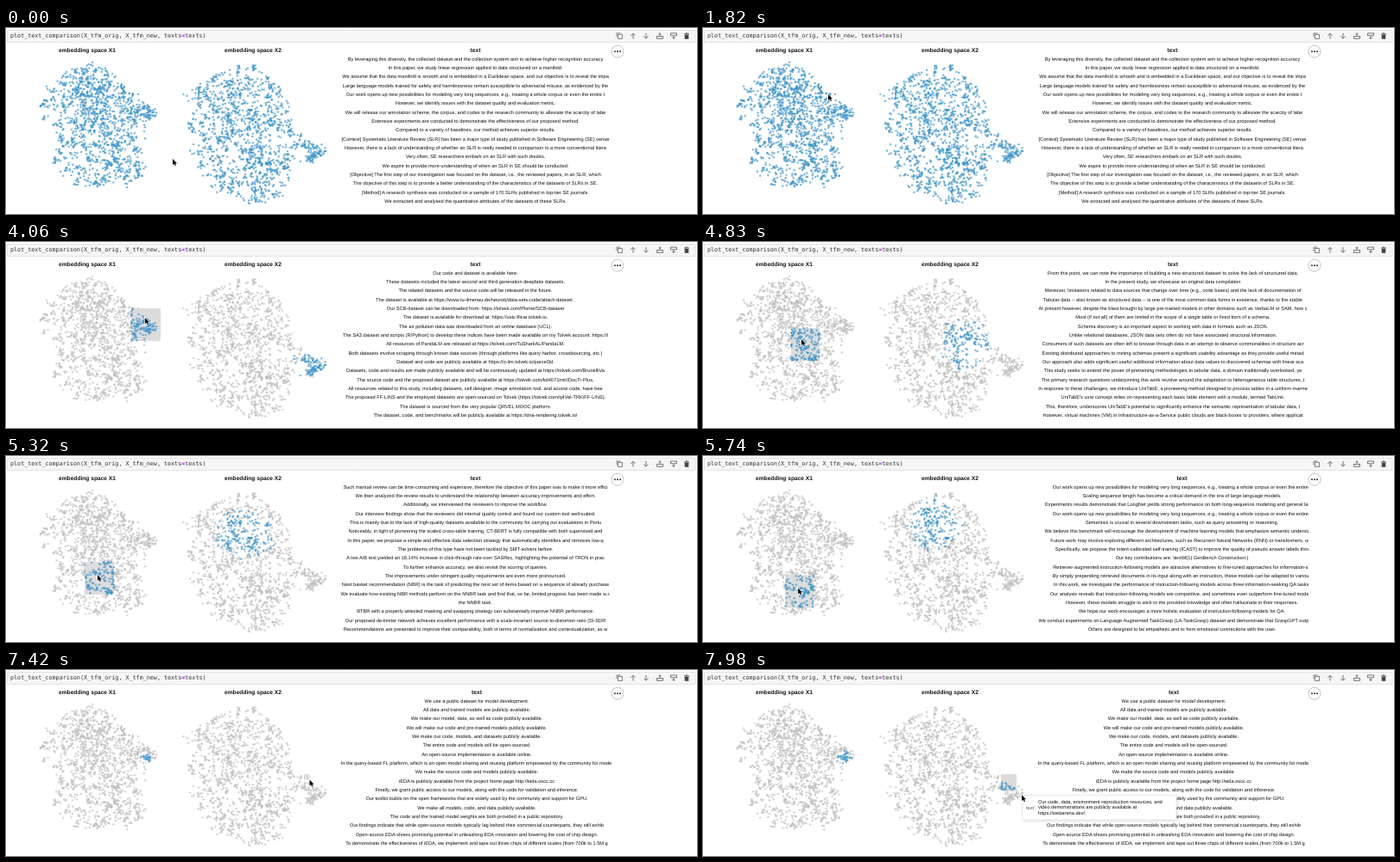
These frames come from a looping animation (800 by 216 pixels, 8000 ms). An HTML page with a canvas:

```html
<!DOCTYPE html>
<html lang="en">
<head>
<meta charset="utf-8">
<title>Embedding comparison</title>
<style>
html, body { margin: 0; width: 100%; height: 100%; overflow: hidden; background: #fff; }
canvas { display: block; }
</style>
</head>
<body>
<canvas id="stage" width="800" height="216"></canvas>
<script>
const LOOP = 8000;
const BLUE = 'rgba(62,148,200,.68)', GRAY = 'rgba(192,192,192,.68)';
const SANS = '"Liberation Sans", Arial, sans-serif';
const MONO = '"DejaVu Sans Mono", monospace';
const BODY = '5.67px ' + SANS, TITLE = 'bold 6.63px ' + SANS;
const ctx = document.getElementById('stage').getContext('2d');
ctx.textRendering = 'geometricPrecision';

// Each list: start time, column centre, rows
const lists = [
  [0, 543.5, `By leveraging this diversity, the collected dataset and the collection system aim to achieve higher recognition accuracy
In this paper, we study linear regression applied to data structured on a manifold.
We assume that the data manifold is smooth and is embedded in a Euclidean space, and our objective is to reveal the impa
Large language models trained for safety and harmlessness remain susceptible to adversarial misuse, as evidenced by the
Our work opens up new possibilities for modeling very long sequences, e.g., treating a whole corpus or even the entire I
However, we identify issues with the dataset quality and evaluation metric.
We will release our annotation scheme, the corpus, and codes to the research community to alleviate the scarcity of labe
Extensive experiments are conducted to demonstrate the effectiveness of our proposed method.
Compared to a variety of baselines, our method achieves superior results.
[Context] Systematic Literature Review (SLR) has been a major type of study published in Software Engineering (SE) venue
However, there is a lack of understanding of whether an SLR is really needed in comparison to a more conventional litera
Very often, SE researchers embark on an SLR with such doubts.
We aspire to provide more understanding of when an SLR in SE should be conducted.
[Objective] The first step of our investigation was focused on the dataset, i.e., the reviewed papers, in an SLR, which
The objective of this step is to provide a better understanding of the characteristics of the datasets of SLRs in SE.
[Method] A research synthesis was conducted on a sample of 170 SLRs published in top-tier SE journals.
We extracted and analysed the quantitative attributes of the datasets of these SLRs.`],
  [1890, 543.5, `Our code and dataset is available here.
These datasets included the latest second and third generation deepfake datasets.
The related datasets and the source code will be released in the future.
The dataset is available at https://www.tu-ilmenau.de/neurob/data-sets-code/attach-dataset .
Our SCB-dataset can be downloaded from: https://tolvek.com/Plorne/SCB-dataset
The dataset is available for download at: https://ustc-flicar.tolvek.io.
The air pollution data was downloaded from an online database (UCL).
The SA3 dataset and scripts (R/Python) to develop these indices have been made available on my Tolvek account: https://t
All resources of PandaLM are released at https://tolvek.com/TuSharkAL/PandaLM.
Both datasets involve scraping through known data sources (through platforms like query harbor, crowdsourcing, etc.)
Dataset and code are publicly available at https://o-lim.tolvek.io/parcel3d.
Datasets, code and results are made publicly available and will be continuously updated at https://tolvek.com/BrunelliVa
The source code and the proposed dataset are publicly available at https://tolvek.com/kd4071mirl/DocTr-Plus.
All resources related to this study, including datasets, cell designer, image annotation tool, and source code, have bee
The proposed FF-LINS and the employed datasets are open-sourced on Tolvek (https://tolvek.com/q4Vel-TRK/FF-LINS).
The dataset is sourced from the very popular QRVEL MOOC platform.
The dataset, code, and benchmarks will be publicly available at https://dna-rendering.tolvek.io/`],
  [4410, 544, `From this point, we can note the importance of building a new structured dataset to solve the lack of structured data.
In the present study, we showcase an original data compilation
Moreover, limitations related to data sources that change over time (e.g., code bases) and the lack of documentation of
Tabular data -- also known as structured data -- is one of the most common data forms in existence, thanks to the stable
At present however, despite the blast brought by large pre-trained models in other domains such as VerbaLM or SAM, how c
Most (if not all) of them are limited in the scope of a single table or fixed form of a schema.
Schema discovery is an important aspect to working with data in formats such as JSON.
Unlike relational databases, JSON data sets often do not have associated structural information.
Consumers of such datasets are often left to browse through data in an attempt to observe commonalities in structure acr
Existing distributed approaches to mining schemas present a significant usability advantage as they provide useful metad
Our approach also adds significant useful additional information about data values to discovered schemas with linear sca
This study seeks to extend the power of pretraining methodologies to tabular data, a domain traditionally overlooked, ye
The primary research questions underpinning this work revolve around the adaptation to heterogeneous table structures, t
In response to these challenges, we introduce UniTabE, a pioneering method designed to process tables in a uniform manne
UniTabE's core concept relies on representing each basic table element with a module, termed TabUnit.
This, therefore, underscores UniTabE's potential to significantly enhance the semantic representation of tabular data, t
However, virtual machines (VM) in Infrastructure-as-a-Service public clouds are black-boxes to providers, where applicat`],
  [5040, 543.5, `Such manual review can be time-consuming and expensive, therefore the objective of this paper was to make it more effici
We then analyzed the review results to understand the relationship between accuracy improvements and effort.
Additionally, we interviewed the reviewers to improve the workflow.
Our interview findings show that the reviewers did internal quality control and found our custom tool well-suited.
This is mainly due to the lack of high-quality datasets available to the community for carrying out evaluations in Portu
Noticeably, in light of pioneering the scaled cross-table training, CT-BERT is fully compatible with both supervised and
In this paper, we propose a simple and effective data selection strategy that automatically identifies and removes low-q
The problems of this type have not been tackled by SMT-solvers before.
A live A/B test yielded an 18.14% increase in click-through rate over SASRec, highlighting the potential of TRON in prac
To further enhance accuracy, we also revisit the scoring of queries.
The improvements under stringent quality requirements are even more pronounced.
Next basket recommendation (NBR) is the task of predicting the next set of items based on a sequence of already purchase
We evaluate how existing NBR methods perform on the NNBR task and find that, so far, limited progress has been made w.r.
the NNBR task.
BTBR with a properly selected masking and swapping strategy can substantially improve NNBR performance.
Our proposed de-limiter network achieves excellent performance with a scale-invariant source-to-distortion ratio (SI-SDR
Recommendations are presented to improve their comparability, both in terms of normalization and contextualization, as w`],
  [5740, 554.5, String.raw`Our work opens up new possibilities for modeling very long sequences, e.g., treating a whole corpus or even the entire I
Scaling sequence length has become a critical demand in the era of large language models.
Experiments results demonstrate that LongNet yields strong performance on both long-sequence modeling and general langua
Our work opens up new possibilities for modeling very long sequences, e.g., treating a whole corpus or even the entire I
Semantics is crucial in several downstream tasks, such as query answering or reasoning.
We believe this benchmark will encourage the development of machine learning models that emphasize semantic understandin
Future work may involve exploring different architectures, such as Recurrent Neural Networks (RNN) or transformers, or e
Specifically, we propose the intent-calibrated self-training (ICAST) to improve the quality of pseudo answer labels thro
Our key contributions are: \textbf{1) GenBench Construction:}
Retriever-augmented instruction-following models are attractive alternatives to fine-tuned approaches for information-se
By simply prepending retrieved documents in its input along with an instruction, these models can be adapted to various
In this work, we investigate the performance of instruction-following models across three information-seeking QA tasks.
Our analysis reveals that instruction-following models are competitive, and sometimes even outperform fine-tuned models.
However, these models struggle to stick to the provided knowledge and often hallucinate in their responses.
We hope our work encourages a more holistic evaluation of instruction-following models for QA.
We conduct experiments on Language Augmented TaskGrasp (LA-TaskGrasp) dataset and demonstrate that GraspGPT outperforms
Others are designed to be empathetic and to form emotional connections with the user.`],
  [7280, 545, `We use a public dataset for model development.
All data and trained models are publicly available.
We make our model, data, as well as code publicly available.
We will make our code and pre-trained models publicly available.
We make our code, models, and datasets publicly available.
The entire code and models will be open-sourced.
An open-source implementation is available online.
In the query-based FL platform, which is an open model sharing and reusing platform empowered by the community for model
We make the source code and models publicly available.
iEDA is publicly available from the project home page http://ieda.oscc.cc
Finally, we grant public access to our models, along with the code for validation and inference.
Our toolkit builds on the open frameworks that are widely used by the community and support for GPU.
We make all models, code, and data publicly available.
The code and the trained model weights are both provided in a public repository.
Our findings indicate that while open-source models typically lag behind their commercial counterparts, they still exhib
Open-source EDA shows promising potential in unleashing EDA innovation and lowering the cost of chip design.
To demonstrate the effectiveness of iEDA, we implement and tape out three chips of different scales (from 700k to 1.5M g`],
].map(([start, x, text]) => ({ start, x, rows: text.split('\n') }));

// Tracks: time followed by the values at that time
const cursorTrack = [
  [0, 193, 152], [490, 193, 152], [1400, 145, 77], [1820, 145, 77], [2600, 179, 115],
  [3430, 179, 115], [3850, 161, 88], [4130, 161, 88], [4800, 114, 113], [4850, 114, 113],
  [5300, 106, 138], [5380, 106, 138], [6090, 114, 168], [6300, 114, 168], [6500, 137, 160],
  [6560, 137, 160], [7150, 345, 121], [7230, 345, 121], [7700, 363, 139], [7790, 363, 139], [7960, 369, 145],
];
// Left brush (x, y, w, h) and its linked blob on the right (cx, cy, rx, ry)
const leftTrack = [
  [1820, 145, 77, 0, 0, 358, 143, 3, 3], [2600, 145, 77, 34, 38, 358, 143, 25, 21],
  [4130, 145, 77, 34, 38, 358, 143, 25, 21], [4800, 102, 100, 33, 38, 304, 118, 27, 30],
  [4850, 102, 100, 33, 38, 304, 118, 27, 30], [5300, 91, 123, 34, 38, 277, 90, 34, 27],
  [5380, 91, 123, 34, 38, 277, 90, 34, 27], [6090, 99, 153, 33, 38, 262, 68, 24, 32],
];
const rightTrack = [
  [7230, 345, 121, 0, 0, 163, 103, 3, 3], [7700, 345, 121, 18, 18, 163, 103, 11, 9],
];

function at(track, t) {
  const i = track.findIndex(key => key[0] > t);
  if (i === 0) return track[0].slice(1);
  if (i < 0) return track[track.length - 1].slice(1);
  const a = track[i - 1], b = track[i];
  const u = (t - a[0]) / (b[0] - a[0]), e = u * u * (3 - 2 * u);
  return a.slice(1).map((v, k) => v + (b[k + 1] - v) * e);
}

let seed = 20231;
function rand() {
  seed = (seed * 1664525 + 1013904223) >>> 0;
  return seed / 4294967296;
}
const gauss = () => Math.sqrt(-2 * Math.log(1 - rand())) * Math.cos(2 * Math.PI * rand());

// Uneven cloud inside an outline: hubs (x, y, spread, count), small clumps, a few strays
function makeCloud(outline, hubs, count) {
  const shape = new Path2D('M' + outline + 'Z');
  const inside = (x, y) => ctx.isPointInPath(shape, x, y);
  const points = [];
  const add = (x, y) => points.push({ x, y, reach: 0.15 + 1.2 * rand() });
  const pick = () => {
    let x, y;
    do { x = 28 + rand() * 352; y = 34 + rand() * 176; } while (!inside(x, y));
    return [x, y];
  };
  for (const [x, y, spread, n] of hubs)
    for (let i = 0; i < n; i++) {
      const px = x + gauss() * spread, py = y + gauss() * spread;
      if (inside(px, py)) add(px, py);
    }
  while (points.length < count) {
    const [x, y] = pick();
    const size = 1 + Math.floor(rand() * rand() * 7);
    const stray = rand() < 0.05 ? 11 : 1;
    const cx = x + gauss() * stray, cy = y + gauss() * stray;
    for (let i = 0; i < size; i++) add(cx + gauss() * 1.7, Math.max(37, cy + gauss() * 1.7));
  }
  return points;
}
const left = makeCloud(
  '66 52L82 45L95 41L112 44L128 56L146 72L159 85L174 95L175 103L161 111L166 126L159 141L161 166L149 177L124 184L102 184L82 179L58 167L53 152L64 128L47 112L40 94L48 70',
  [[104, 98, 19, 250], [88, 64, 13, 70], [162, 97, 7, 70], [118, 160, 14, 60]], 1450);
const right = makeCloud(
  '267 45L286 42L306 58L319 69L329 86L329 108L341 127L356 131L374 139L368 150L354 157L335 155L332 172L328 184L314 199L293 206L272 207L252 197L236 183L226 167L214 147L222 126L206 114L220 96L208 85L208 70L226 64L241 54',
  [[278, 104, 24, 200], [262, 68, 13, 70], [356, 143, 8, 70], [292, 160, 20, 120]], 1500);

const inBox = (p, [x, y, w, h]) => p.x >= x && p.x <= x + w && p.y >= y && p.y <= y + h;
const inBlob = (p, [, , , , cx, cy, rx, ry]) =>
  ((p.x - cx) / rx) ** 2 + ((p.y - cy) / ry) ** 2 < p.reach;

function dots(points, color) {
  ctx.fillStyle = color;
  for (const { x, y } of points) {
    ctx.beginPath();
    ctx.arc(x, y, 1.2, 0, 7);
    ctx.fill();
  }
}
function cloud(points, chosen) {
  dots(points.filter(p => !chosen(p)), GRAY);
  dots(points.filter(chosen), BLUE);
}
function label(text, x, y, font, align = 'center', color = '#111') {
  ctx.font = font;
  ctx.textAlign = align;
  ctx.textBaseline = 'middle';
  ctx.fillStyle = color;
  ctx.fillText(text, x, y);
}
function stroke(path, color, width = 0.8) {
  ctx.strokeStyle = color;
  ctx.lineWidth = width;
  ctx.stroke(new Path2D(path));
}

function drawCell() {
  ctx.fillStyle = '#f6f6f6';
  ctx.fillRect(1, 2, 797, 14.5);
  stroke('M1.5 2.5H798V16.5H1.5Z', '#dedede');
  const font = '6.73px ' + MONO;
  const head = 'plot_text_comparison(X_tfm_orig, X_tfm_new, texts', tail = 'texts)';
  label(head, 5, 9.5, font, 'left', '#333');
  let x = 5 + ctx.measureText(head).width;
  label('=', x, 9.5, 'bold ' + font, 'left', '#a2f');
  x += ctx.measureText('=').width;
  label(tail, x, 9.5, font, 'left', '#333');

  stroke('M708.5 7.5H713.5V12.5H708.5ZM707 10.5V6H711.5', '#666');
  stroke('M726 12.5V6.5M723.3 9L726 6.3L728.7 9M741 6V12M738.3 9.5L741 12.2L743.7 9.5', '#555');
  stroke('M753.5 9.5H760.5V12.3H753.5ZM757 8.5V5.5M755.5 7H758.5', '#555');
  stroke('M769.5 6H776.5V8.8H769.5ZM773 9.5V13M771.5 11.3H774.5', '#555');
  stroke('M785 7H791M787 6H789', '#444', 1);
  ctx.fillStyle = '#444';
  ctx.fillRect(785.7, 8, 4.6, 4.8);
}

function drawMenu() {
  ctx.beginPath();
  ctx.arc(708, 27.2, 7, 0, 7);
  ctx.fillStyle = '#fff';
  ctx.fill();
  ctx.strokeStyle = '#aaa';
  ctx.lineWidth = 0.7;
  ctx.stroke();
  ctx.fillStyle = '#222';
  for (const x of [705, 708, 711]) {
    ctx.beginPath();
    ctx.arc(x, 27.2, 0.95, 0, 7);
    ctx.fill();
  }
}

function drawTexts(t) {
  const { x, rows } = lists.findLast(list => list.start <= t);
  label('text', x, 25.8, TITLE);
  ctx.save();
  ctx.beginPath();
  ctx.rect(385, 30, 316, 180);
  ctx.clip();
  rows.forEach((row, i) => label(row, x, 36 + i * 10.34, BODY));
  ctx.restore();
}

function drawBrush([x, y, w, h]) {
  ctx.fillStyle = '#dcdcdc';
  ctx.fillRect(x, y, w, h);
}

function drawTooltip() {
  ctx.save();
  ctx.shadowColor = 'rgba(0,0,0,.15)';
  ctx.shadowBlur = 4;
  ctx.shadowOffsetX = ctx.shadowOffsetY = 1;
  ctx.fillStyle = '#fff';
  ctx.fillRect(370, 145.5, 178, 28.5);
  ctx.restore();
  stroke('M370 145.5H548V174H370Z', '#ddd', 0.6);
  label('text:', 374, 160, BODY, 'left', '#555');
  ['Our code, data, environment reproduction resources, and',
    'video demonstrations are publicly available at',
    'https://webarena.dev/.'].forEach((line, i) => label(line, 388, 153.2 + i * 6.6, BODY, 'left'));
}

function drawCursor([x, y]) {
  const arrow = new Path2D();
  arrow.addPath(new Path2D('M0 0V7L1.6 5.6L2.7 8L3.9 7.4L2.9 5.2H5Z'), { e: x, f: y });
  ctx.strokeStyle = '#fff';
  ctx.lineWidth = 1.2;
  ctx.stroke(arrow);
  ctx.fillStyle = '#000';
  ctx.fill(arrow);
}

function draw(t) {
  ctx.fillStyle = '#fff';
  ctx.fillRect(0, 0, 800, 216);
  drawCell();
  label('embedding space X1', 94, 25.8, TITLE);
  label('embedding space X2', 286, 25.8, TITLE);

  const active = t >= lists[1].start;
  const onRight = t >= lists[5].start;
  const selection = at(onRight ? rightTrack : leftTrack, t);
  if (active) drawBrush(selection);
  const boxed = p => !active || inBox(p, selection);
  const linked = p => !active || inBlob(p, selection);
  cloud(left, onRight ? linked : boxed);
  cloud(right, onRight ? boxed : linked);

  drawTexts(t);
  drawMenu();
  if (t >= 7940) drawTooltip();
  drawCursor(at(cursorTrack, t));
}

function tick() {
  draw(performance.now() % LOOP);
  requestAnimationFrame(tick);
}
tick();
</script>
</body>
</html>
```
